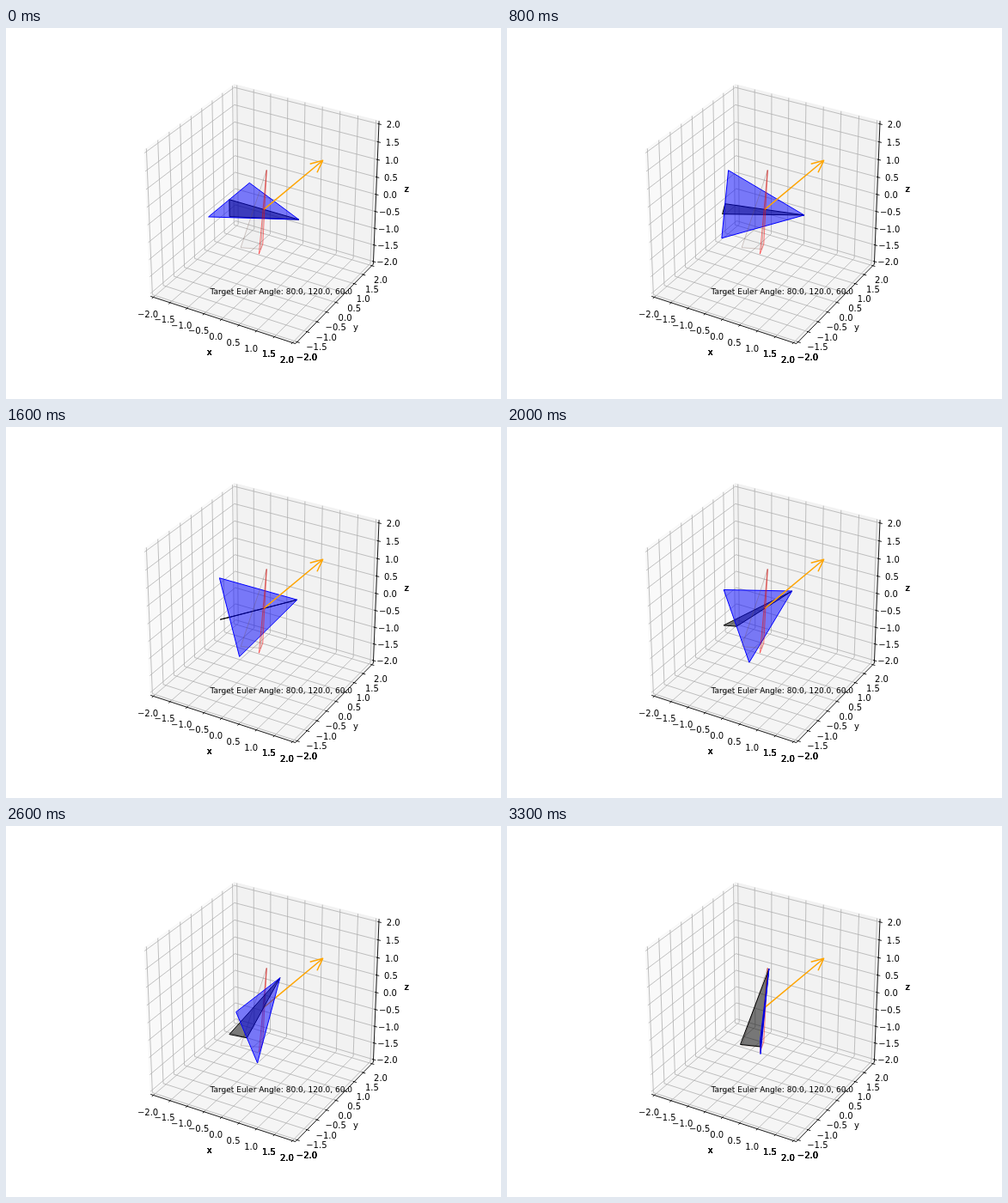
Animation of 576 by 432 pixels, one loop 3.4 s. Source, as an HTML page with a canvas:

```html
<!DOCTYPE html>
<html>
<head>
<meta charset="utf-8">
<style>
html, body { margin: 0; width: 576px; height: 432px; overflow: hidden; background: #fff; }
canvas { display: block; }
</style>
</head>
<body>
<canvas id="stage" width="576" height="432"></canvas>
<script>
const ctx = document.getElementById('stage').getContext('2d');
const STEPS = 34, STEP_MS = 100;
const EDGE = 2 + 1 / 12;   // panes reach a little past the axis limits
const TICKS = Array.from({ length: 9 }, (_, i) => i / 2 - 2);

// Camera at elevation 30, azimuth -60
const C = Math.sqrt(3) / 2;
const RIGHT = [C, .5, 0], UP = [-.25, C / 2, C], NEAR = [C / 2, -.75, .5];

const dot = (a, b) => a[0] * b[0] + a[1] * b[1] + a[2] * b[2];
const cross = (a, b) => [0, 1, 2].map(i => {
  const j = (i + 1) % 3, k = (i + 2) % 3;
  return a[j] * b[k] - a[k] * b[j];
});
const depth = p => dot(p, NEAR);
const project = p => {
  const s = 1868 / (40 - depth(p));
  return [299.9 + s * dot(p, RIGHT), 211.3 - s * dot(p, UP)];
};

// Target attitude: turns about x, y and z, joined into one axis and angle
const half = [80, 120, 60].map(d => d * Math.PI / 360);
const [ca, cb, cc] = half.map(Math.cos), [sa, sb, sc] = half.map(Math.sin);
const ANGLE = 2 * Math.acos(ca * cb * cc - sa * sb * sc);
const AXIS = [
  sa * cb * cc + ca * sb * sc,
  ca * sb * cc - sa * cb * sc,
  ca * cb * sc + sa * sb * cc
].map(v => v / Math.sin(ANGLE / 2));

function rotate(p, angle) {
  const c = Math.cos(angle), s = Math.sin(angle);
  const k = dot(AXIS, p) * (1 - c), side = cross(AXIS, p);
  return p.map((v, i) => v * c + side[i] * s + AXIS[i] * k);
}

const WING = [[1, 0, 0], [-1, -1, 0], [-1, 1, 0]];
const KEEL = [[1, 0, 0], [-1, 0, 0], [-1, 0, -.5]];

function trace(points, closed) {
  ctx.beginPath();
  points.forEach(p => ctx.lineTo(...p));
  if (closed) ctx.closePath();
}
function line(points, color, width) {
  trace(points);
  ctx.strokeStyle = color;
  ctx.lineWidth = width;
  ctx.stroke();
}
function polygon(points, fill, stroke, width) {
  trace(points.map(project), true);
  ctx.fillStyle = fill;
  ctx.fill();
  ctx.strokeStyle = stroke;
  ctx.lineWidth = width;
  ctx.stroke();
}
function label(text, [x, y], dy, repeat = 1) {
  ctx.font = '10px "DejaVu Sans", sans-serif';
  ctx.textAlign = 'center';
  ctx.fillStyle = '#000';
  while (repeat--) ctx.fillText(text, x, y + dy);
}

function drawBox() {
  const E = EDGE, pane = (pts, color) => polygon(pts, color, color, 1);
  pane([[-E, -E, -E], [-E, E, -E], [-E, E, E], [-E, -E, E]], '#f9f9f9');
  pane([[-E, E, -E], [E, E, -E], [E, E, E], [-E, E, E]], '#f2f2f2');
  pane([[-E, -E, -E], [E, -E, -E], [E, E, -E], [-E, E, -E]], '#f5f5f5');

  const grid = pts => line(pts.map(project), '#b0b0b0', .8);
  for (const t of TICKS) {
    grid([[t, E, E], [t, E, -E], [t, -E, -E]]);
    grid([[-E, t, E], [-E, t, -E], [E, t, -E]]);
    grid([[-E, -E, t], [-E, E, t], [E, E, t]]);
  }
}

// Each axis: its edge of the box and the direction its ticks point
const AXES = [
  { name: 'x', at: (t, e) => [t, -e, -e], tick: [0, -1, 0], heavy: [1.5, 2], dy: 7, nameDy: 6, nameRepeat: 4 },
  { name: 'y', at: (t, e) => [e, t, -e], tick: [1, 0, 0], heavy: [-2], dy: 7.4, nameDy: 3, nameRepeat: 1 },
  { name: 'z', at: (t, e) => [e, e, t], tick: [1, 0, 0], heavy: [], dy: 6.6, nameDy: 2, nameRepeat: 4 }
];

function drawAxes() {
  for (const a of AXES) {
    line([a.at(-EDGE, EDGE), a.at(EDGE, EDGE)].map(project), '#000', .9);
    for (const t of TICKS) {
      const p = a.at(t, EDGE);
      const ends = [.0667, -.0333].map(d => project(p.map((v, i) => v + d * a.tick[i])));
      line(ends, '#000', .9);
      const text = t.toFixed(1).replace('-', '\u2212');
      label(text, project(a.at(t, EDGE + .266)), a.dy, a.heavy.includes(t) ? 4 : 1);
    }
    label(a.name, project(a.at(0, EDGE + .578)), a.nameDy, a.nameRepeat);
  }
}

function drawPlane(angle, wing, keel) {
  const turn = pts => pts.map(p => rotate(p, angle));
  const parts = [[turn(KEEL), ...keel], [turn(WING), ...wing]];
  if (depth(rotate([0, 0, 1], angle)) < 0) parts.reverse();
  parts.forEach(part => polygon(...part));
}

function drawArrow() {
  const from = project([0, 0, 0]), to = project(AXIS.map(v => v * 1.97));
  const len = Math.hypot(to[0] - from[0], to[1] - from[1]);
  const dx = (to[0] - from[0]) / len, dy = (to[1] - from[1]) / len;
  const barb = s => [to[0] - 14 * dx - 6.5 * s * dy, to[1] - 14 * dy + 6.5 * s * dx];
  line([from, to], '#ffa500', 1.5);
  line([barb(1), to, barb(-1)], '#ffa500', 1.5);
}

const nearest = angle => Math.max(...[...WING, ...KEEL].map(p => depth(rotate(p, angle))));

function draw(angle) {
  ctx.fillStyle = '#fff';
  ctx.fillRect(0, 0, 576, 432);
  drawBox();
  drawAxes();

  const goal = () => drawPlane(ANGLE,
    ['rgba(255,0,0,.08)', 'rgba(255,0,0,.7)', .7],
    ['rgba(0,0,0,.02)', 'rgba(110,80,70,.5)', .6]);
  const plane = () => drawPlane(angle,
    ['rgba(0,0,255,.5)', '#00f', 1],
    ['rgba(0,0,0,.5)', '#000', 1]);
  const layers = nearest(angle) > nearest(ANGLE) ? [goal, drawArrow, plane] : [plane, drawArrow, goal];
  layers.forEach(layer => layer());

  ctx.font = '9px "DejaVu Sans", sans-serif';
  ctx.textAlign = 'left';
  ctx.fillStyle = '#000';
  ctx.fillText('Target Euler Angle: 80.0, 120.0, 60.0', 237.5, 310);
}

const start = performance.now();
function frame() {
  const step = Math.floor((performance.now() - start) / STEP_MS) % STEPS;
  draw(ANGLE * step / STEPS);
  requestAnimationFrame(frame);
}
ctx.lineJoin = 'round';
frame();
</script>
</body>
</html>
```
